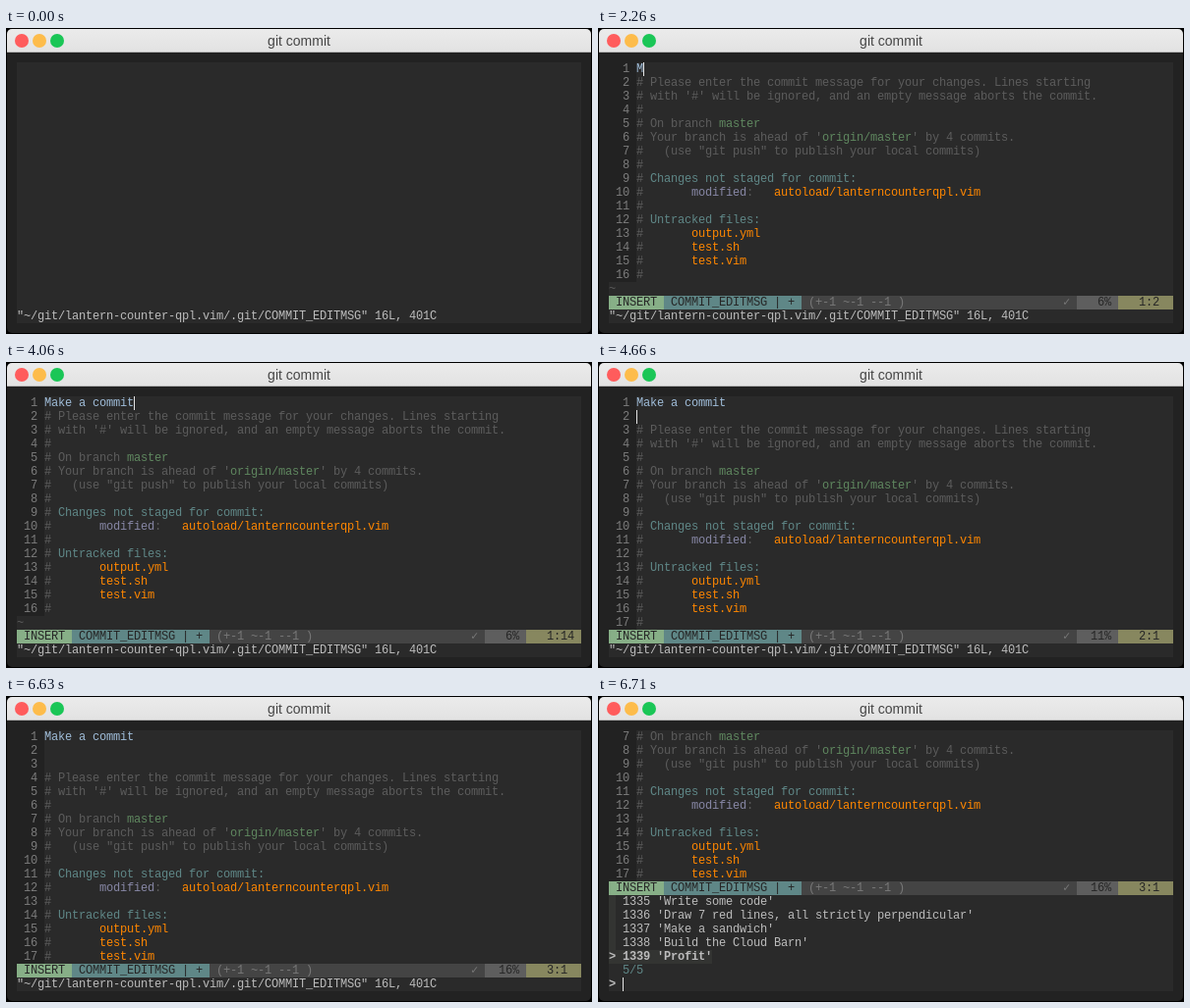
Write an HTML page with a canvas that moves like this. It is 596 px wide and 312 px high and loops after 8 s.

```html
<!DOCTYPE html>
<html lang="en">
<head>
<meta charset="utf-8">
<title>git commit</title>
<style>
  html, body { margin: 0; width: 100%; height: 100%; overflow: hidden; background: #000; }
  canvas { display: block; width: 596px; height: 312px; }
</style>
</head>
<body>
<canvas id="stage" width="596" height="312"></canvas>
<script>
const ctx = document.getElementById('stage').getContext('2d');
const LOOP = 8000;
const LEFT = 11, TOP = 35, CW = 7, CH = 14, COLS = 82, ROWS = 19;
const MONO = '"Liberation Mono", "DejaVu Sans Mono", monospace';
const C = {
  frame: '#222222', bg: '#2a2a2a', gutter: '#222222', pick: '#333432',
  text: '#bcbcbc', dim: '#5c5c5c', num: '#7c7c7c', teal: '#5f8787',
  green: '#5f875f', violet: '#8787a5', orange: '#ff8700', msg: '#9fbcd8',
  insert: '#87af87', pos: '#87875f', pct: '#5e5e5e', bar: '#444444',
  barText: '#787878', ink: '#262626', cursor: '#e4e4e4'
};

const MESSAGE = 'Make a commit';
const KEYS = [2260, 2550, 2930, 3040, 3180, 3270, 3360, 3500, 3570, 3650, 3870, 3910, 4060];
const ENTERS = [4660, 5100];
const READY = 240, HIDE = 6360, SPLIT = 6690, LIST = 6710;

const note = s => [[s, C.dim]];
const heading = s => [['# ', C.dim], [s, C.teal]];
const file = s => [['#       ', C.dim], [s, C.orange]];
const TEMPLATE = [
  note('# Please enter the commit message for your changes. Lines starting'),
  note("# with '#' will be ignored, and an empty message aborts the commit."),
  note('#'),
  [['# On branch ', C.dim], ['master', C.green]],
  [["# Your branch is ahead of '", C.dim], ['origin/master', C.green], ["' by 4 commits.", C.dim]],
  note('#   (use "git push" to publish your local commits)'),
  note('#'),
  heading('Changes not staged for commit:'),
  [['#       ', C.dim], ['modified', C.violet], [':   ', C.dim], ['autoload/lanterncounterqpl.vim', C.orange]],
  note('#'),
  heading('Untracked files:'),
  file('output.yml'),
  file('test.sh'),
  file('test.vim'),
  note('#')
];
const STORIES = ['Write some code', 'Draw 7 red lines, all strictly perpendicular',
  'Make a sandwich', 'Build the Cloud Barn', 'Profit'];

function fill(col, row, cols, rows, color) {
  ctx.fillStyle = color;
  ctx.fillRect(LEFT + col * CW, TOP + row * CH, cols * CW, rows * CH);
}

// Places each character on the terminal grid.
function put(col, row, text, color, bold) {
  ctx.font = (bold ? 'bold ' : '') + '12px ' + MONO;
  ctx.textAlign = 'left';
  ctx.fillStyle = color;
  [...text].forEach((ch, i) => {
    if (ch !== ' ') ctx.fillText(ch, LEFT + (col + i) * CW, TOP + row * CH + 10);
  });
}

function block(col, row, text, color, back) {
  fill(col, row, text.length, 1, back);
  put(col, row, text, color);
  return col + text.length;
}

function cursor(col, row) {
  ctx.fillStyle = C.cursor;
  ctx.fillRect(LEFT + col * CW, TOP + row * CH, 1, CH);
}

function drawWindow() {
  ctx.fillStyle = '#000';
  ctx.fillRect(0, 0, 596, 312);
  ctx.save();
  ctx.beginPath();
  ctx.roundRect(1, 1, 594, 310, 5);
  ctx.clip();
  ctx.fillStyle = C.frame;
  ctx.fillRect(0, 0, 596, 312);
  const shade = ctx.createLinearGradient(0, 1, 0, 25);
  shade.addColorStop(0, '#ebebeb');
  shade.addColorStop(1, '#e2e2e2');
  ctx.fillStyle = shade;
  ctx.fillRect(0, 0, 596, 24);
  ctx.fillStyle = '#b8b8b8';
  ctx.fillRect(0, 24, 596, 1);
  ctx.restore();
  ['#ff5c5c', '#fdbc4b', '#1ac656'].forEach((color, i) => {
    ctx.fillStyle = color;
    ctx.beginPath();
    ctx.arc(16 + 18 * i, 13, 7, 0, Math.PI * 2);
    ctx.fill();
  });
  ctx.font = '14px "Liberation Sans", Arial, sans-serif';
  ctx.textAlign = 'center';
  ctx.fillStyle = '#464646';
  ctx.fillText('git commit', 298, 18);
  fill(0, 0, COLS, ROWS, C.bg);
}

function drawBuffer(lines, first, rows) {
  for (let row = 0; row < rows; row++) {
    const line = lines[first + row];
    if (!line) {
      put(0, row, '~', C.dim);
      continue;
    }
    fill(0, row, 4, 1, C.gutter);
    put(0, row, String(first + row + 1).padStart(3), C.num);
    let col = 4;
    for (const [text, color] of line) {
      put(col, row, text, color);
      col += text.length;
    }
  }
}

function drawStatus(row, dirty, line, col, total) {
  fill(0, row, COLS, 1, C.bar);
  let x = block(0, row, ' INSERT ', C.ink, C.insert);
  x = block(x, row, ' COMMIT_EDITMSG ' + (dirty ? '| + ' : ''), C.ink, C.teal);
  put(x + 1, row, '(+-1 ~-1 --1 )', C.barText);
  put(66, row, '✓', C.barText);
  const percent = Math.floor(100 * line / total) + '%';
  block(68, row, percent.padStart(5) + ' ', C.ink, C.pct);
  block(74, row, ('   ' + line + ':' + col).padEnd(8), C.ink, C.pos);
}

function drawPicker() {
  fill(0, 12, 1, 5, C.pick);
  STORIES.forEach((story, i) => {
    const row = 12 + i, picked = i === STORIES.length - 1;
    const label = `${1335 + i} '${story}'`;
    if (picked) {
      fill(0, row, label.length + 2, 1, C.pick);
      put(0, row, '>', C.text, true);
    }
    put(2, row, label, C.text, picked);
  });
  put(2, 17, '5/5', C.teal);
  put(0, 18, '>', C.text, true);
  cursor(2, 18);
}

function draw(t) {
  drawWindow();
  const split = t >= SPLIT;
  if (!split) put(0, 18, '"~/git/lantern-counter-qpl.vim/.git/COMMIT_EDITMSG" 16L, 401C', C.text);
  if (t < READY) return;

  const past = times => times.filter(at => t >= at).length;
  const typed = past(KEYS), enters = past(ENTERS);
  const lines = [[[MESSAGE.slice(0, typed), C.msg]], ...Array(enters).fill([]), ...TEMPLATE];
  const line = enters + 1, col = enters ? 1 : typed + 1;
  const height = split ? 11 : 17;
  drawBuffer(lines, split ? 6 : 0, height);
  drawStatus(height, typed > 0, line, col, lines.length);
  if (t < HIDE) cursor(3 + col, enters);
  if (t >= LIST) drawPicker();
}

function tick() {
  draw(performance.now() % LOOP);
  requestAnimationFrame(tick);
}
tick();
</script>
</body>
</html>
```
